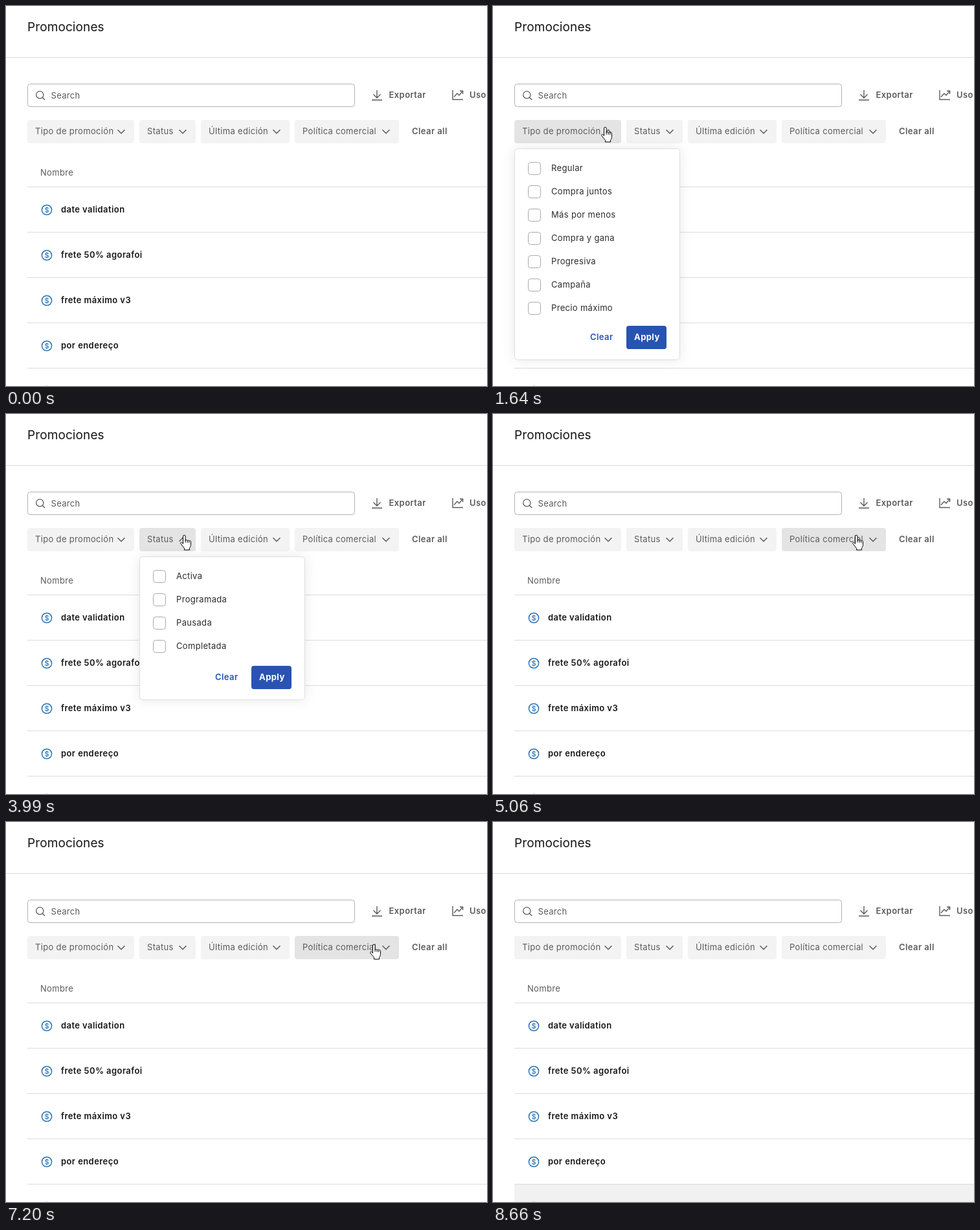
Animation of 743x587 px, one loop 8740 ms. Source, as an HTML page with a canvas:

```html
<!DOCTYPE html>
<html lang="es">
<head>
<meta charset="utf-8">
<title>Promociones</title>
<style>
  html, body { margin: 0; width: 100%; height: 100%; overflow: hidden; background: #fff; }
  canvas { display: block; width: 743px; height: 587px; }
</style>
</head>
<body>
<canvas id="stage"></canvas>
<script>
const W = 743, H = 587, LOOP = 8740;
const LEFT = 33, GAP = 8, BAR = 176, BAR_H = 36, MENU_Y = 220, MENU_W = 256, LIST_Y = 279.5, ROW_H = 70, STEP = 36;
const GREY = '#5b5b5b', INK = '#161616', LINE = '#dcdcdc', BLUE = '#2953b2', BADGE = '#2b73b3', EDGE = '#a9a9a9';

const canvas = document.getElementById('stage');
const ctx = canvas.getContext('2d');
const dpr = window.devicePixelRatio || 1;
canvas.width = W * dpr;
canvas.height = H * dpr;

const rows = ['date validation', 'frete 50% agorafoi', 'frete máximo v3', 'por endereço', ''];

const filters = [
  { label: 'Tipo de promoción', w: 165, open: 1510, close: 2500,
    items: ['Regular', 'Compra juntos', 'Más por menos', 'Compra y gana', 'Progresiva', 'Campaña', 'Precio máximo'] },
  { label: 'Status', w: 87, open: 3990, close: 4990,
    items: ['Activa', 'Programada', 'Pausada', 'Completada'] },
  { label: 'Última edición', w: 137, open: 5750, close: 6300, radio: true,
    items: ['Ayer', 'Últimos 7 días', 'Últimos 30 días', 'Últimos 3 meses', 'Últimos 12 meses'] },
  { label: 'Política comercial', w: 161, open: 7530, close: 8330,
    items: ['Principal', 'Mayorista', 'Minorista'] }
];
let nextX = LEFT;
for (const f of filters) {
  f.x = nextX;
  nextX += f.w + GAP;
  f.h = Math.min(327, 78 + f.items.length * STEP);
}

// the pointer rests between moves
const home = { x: -14, y: 258 };
const moves = [
  { from: 440, to: 1200, x: 174, y: 187 },
  { from: 2710, to: 2780, x: 246, y: 187 },
  { from: 3040, to: 3180, x: 276, y: 187 },
  { from: 4960, to: 5060, x: 562, y: 187 },
  { from: 5280, to: 5560, x: 429, y: 190 },
  { from: 6630, to: 7180, x: 569, y: 189 },
  { from: 8480, to: 8660, x: 690, y: 600 }
];

const hand = new Path2D('M4.5 14V2.5a1.8 1.8 0 0 1 3.6 0V9a1.6 1.6 0 0 1 3 .3a1.5 1.5 0 0 1 2.8 .6' +
  'a1.4 1.4 0 0 1 2.6 1V16c0 2-1.5 3.5-2 5V23.5H6.5V21C5 18.5 2.5 16.5 .8 13.5C0 12 2.2 11 3.2 12.3Z');
const knuckles = new Path2D('M8.1 8.5V12M11.1 9.5V12.3M13.9 10V12.5');
const arrow = new Path2D('M.5 .5V16.5L4.2 13L6.8 19L9.2 18L6.7 12.2H12Z');

const smooth = p => p * p * (3 - 2 * p);
const isOpen = (f, t) => t >= f.open && t < f.close;

function pointerAt(t) {
  let { x, y } = home;
  for (const m of moves) {
    const k = smooth(Math.min(1, Math.max(0, (t - m.from) / (m.to - m.from))));
    x += (m.x - x) * k;
    y += (m.y - y) * k;
  }
  return { x, y };
}

const filterAt = ({ x, y }) =>
  y >= BAR && y < BAR + BAR_H ? filters.find(f => x >= f.x && x < f.x + f.w) : undefined;
const rowAt = ({ y }) => Math.floor((y - LIST_Y) / ROW_H);

function text(str, x, y, color = GREY, weight = 400, size = 13) {
  ctx.font = `${weight} ${size}px Inter, "Open Sans", sans-serif`;
  ctx.letterSpacing = size > 13 ? '0.1px' : weight > 400 ? '0.42px' : '0.33px';
  ctx.fillStyle = color;
  ctx.fillText(str, x, y);
}

function stroke(color, width) {
  ctx.strokeStyle = color;
  ctx.lineWidth = width;
  ctx.stroke();
}

function box(x, y, w, h, fill, border) {
  ctx.beginPath();
  ctx.roundRect(x, y, w, h, 4);
  ctx.fillStyle = fill;
  ctx.fill();
  if (border) stroke(border, 1);
}

function circle(x, y, r, color, width) {
  ctx.beginPath();
  ctx.arc(x, y, r, 0, Math.PI * 2);
  stroke(color, width);
}

function path(d, color = GREY, width = 1.4) {
  ctx.strokeStyle = color;
  ctx.lineWidth = width;
  ctx.stroke(new Path2D(d));
}

function drawHeader() {
  text('Promociones', LEFT, 39, INK, 400, 19);
  path(`M0 79.5H${W}`, LINE, 1);
  box(LEFT + .5, 120.5, 505, 35, '#fff', '#b2b2b2');
  circle(52.3, 137.3, 5.6, GREY, 1.3);
  path('M56.4 141.4l3.8 3.6');
  text('Search', 69.5, 143);
  path('M573 130v12M567.5 136.5l5.5 5.5l5.5-5.5M565 145.2h16');
  text('Exportar', 591.5, 142, GREY, 600);
  path('M690 130v14.5h16M692 140.5l5-5.5l3 3l5.3-6.5M701 131.2h4.6v4.8');
  text('Uso', 716, 142, GREY, 600);
  text('Clear all', 627, 198, GREY, 600);
}

function drawRows(active) {
  text('Nombre', 53, 262);
  rows.forEach((name, i) => {
    const y = LIST_Y + i * ROW_H, mid = y + 35.5;
    if (i === active) {
      ctx.fillStyle = '#f1f1f1';
      ctx.fillRect(LEFT, y, W - LEFT, ROW_H);
    }
    path(`M${LEFT} ${y}H${W}`, LINE, 1);
    circle(63, mid, 7.6, BADGE, 1.5);
    ctx.textAlign = 'center';
    text('$', 63.2, mid + 4, BADGE, 500, 11);
    ctx.textAlign = 'left';
    text(name, 85, mid + 4, INK, 600);
  });
}

function drawFilter(f, hot, open) {
  box(f.x, BAR, f.w, BAR_H, hot ? '#e4e4e4' : '#f3f3f3');
  text(f.label, f.x + 12, 198);
  const d = open ? -5.6 : 5.6;
  path(`M${f.x + f.w - 25.5} ${194 - d / 2}l5.5 ${d}l5.5 ${-d}`, GREY, 1.5);
}

function drawMenu(f) {
  const right = f.x + MENU_W, bottom = MENU_Y + f.h;
  ctx.save();
  ctx.shadowColor = 'rgba(0,0,0,.09)';
  ctx.shadowBlur = 20 * dpr;
  box(f.x, MENU_Y, MENU_W, f.h, '#fff');
  ctx.restore();
  box(f.x + .5, MENU_Y + .5, MENU_W - 1, f.h - 1, '#fff', '#dedede');
  f.items.forEach((item, i) => {
    const y = 251 + i * STEP;
    if (f.radio) circle(f.x + 31, y, 9.5, EDGE, 1);
    else box(f.x + 21.5, y - 9.5, 19, 19, '#fff', EDGE);
    text(item, f.x + (f.radio ? 49 : 57), y + 4, '#2c2c2c');
  });
  text('Clear', right - 139, bottom - 31, BLUE, 600);
  box(right - 83, bottom - 53, 62, 36, BLUE);
  text('Apply', right - 71, bottom - 31, '#fff', 700);
}

function drawPointer({ x, y }, isHand) {
  const shape = isHand ? hand : arrow;
  ctx.save();
  ctx.translate(isHand ? x - 7 : x, isHand ? y - .5 : y);
  ctx.lineJoin = 'round';
  ctx.fillStyle = '#fff';
  ctx.strokeStyle = '#000';
  ctx.lineWidth = 1;
  ctx.fill(shape);
  ctx.stroke(shape);
  if (isHand) ctx.stroke(knuckles);
  ctx.restore();
}

function draw(t) {
  ctx.setTransform(dpr, 0, 0, dpr, 0, 0);
  ctx.fillStyle = '#fff';
  ctx.fillRect(0, 0, W, H);
  const p = pointerAt(t), over = filterAt(p), row = rowAt(p);
  drawHeader();
  drawRows(row);
  for (const f of filters) drawFilter(f, f === over, isOpen(f, t));
  filters.filter(f => isOpen(f, t)).forEach(drawMenu);
  drawPointer(p, over || row >= 0);
}

const start = performance.now();
function tick() {
  draw((performance.now() - start) % LOOP);
  requestAnimationFrame(tick);
}
tick();
</script>
</body>
</html>
```
